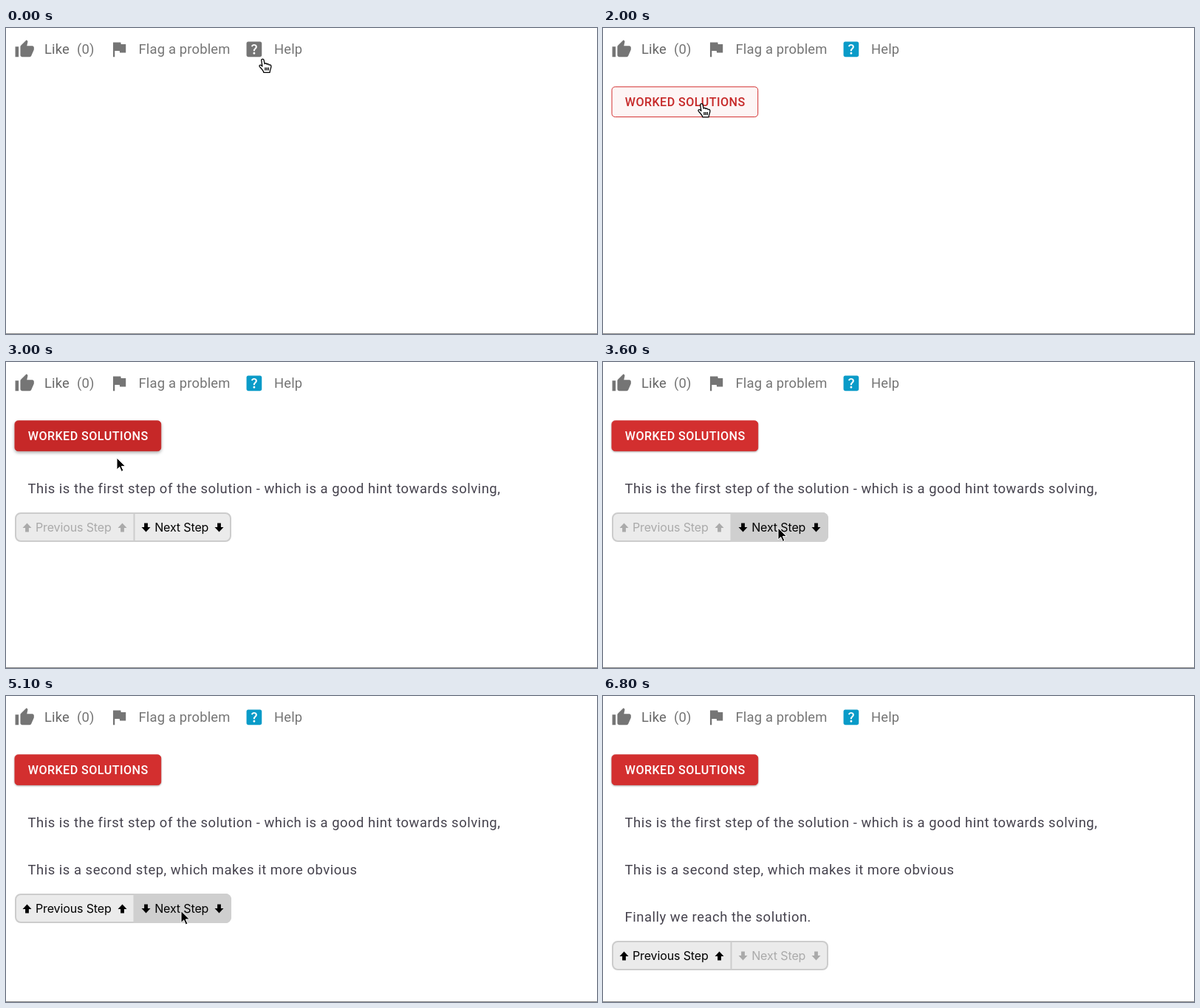
These frames come from a looping animation (800 px wide and 415 px high, 7.8 s). An HTML page:

```html
<!DOCTYPE html>
<html lang="en">
<head>
<meta charset="utf-8">
<title>Worked solutions</title>
<style>
  html, body { margin: 0; height: 100%; overflow: hidden; background: #fff; }
  svg { display: block; width: 100vw; height: 100vh; }
  text { font: 18.4px Roboto, sans-serif; letter-spacing: .17px; fill: #757575; white-space: pre; }
  .icon { fill: #757575; }
  .line { letter-spacing: .54px; fill: #45424d; }
  #label { font-size: 16.1px; font-weight: 500; letter-spacing: .46px; }
  #steps text { font: 16px Inter, sans-serif; letter-spacing: -.13px; fill: inherit; }
</style>
</head>
<body>
<svg viewBox="0 0 800 415">
  <defs>
    <clipPath id="group"><rect x="12" y="204" width="293" height="40" rx="8"/></clipPath>
    <path id="up" d="M0-6 6 .4H2.4V6h-4.8V.4H-6z"/>
    <path id="down" d="M0 6 6-.4H2.4V-6h-4.8v5.6H-6z"/>
    <path id="arrow" d="M0 0v16l3.7-3.6 2.6 6 2.6-1.1-2.6-5.9h5.2z" stroke="#fff"/>
    <g id="hand" fill="#fff" stroke="#000" stroke-width="1.3" stroke-linejoin="round">
      <path d="M-1.8 1.6C-1.8-.4 1.4-.4 1.6 1.6L2.6 6.6C3.4 5.6 5.4 5.8 5.8 7.2 6.6 6.4 8.3 6.8 8.6 8.1 10 7.4 11.4 8.2 11.4 9.8 11.4 13 10 14 9.6 18.3H1.4C.8 15.6-1.6 13.4-4.2 10.4-5.4 8.8-3.4 7.4-2 8.6L-.6 10Z"/>
      <path d="M3.4 11.5v4M5.6 11.5v4M7.8 11.5v4"/>
    </g>
    <path id="bar" d="M-3.5-9.3q3 0 3.5 2 .5-2 3.5-2M0-7.3V7.3M-3.5 9.3q3 0 3.5-2 .5 2 3.5 2M-2 3h4"/>
    <g id="ibeam" fill="none">
      <use href="#bar" stroke="#fff" stroke-width="3"/>
      <use href="#bar" stroke="#000" stroke-width="1.4"/>
    </g>
  </defs>

  <circle id="halo" cx="335.6" cy="28.6" r="22.8"/>
  <circle id="ripple" cx="335.6" cy="28.6"/>
  <path class="icon" transform="translate(11.4 15) scale(1.15)" d="M1 21h4V9H1v12zm22-11c0-1.1-.9-2-2-2h-6.31l.95-4.57.03-.32c0-.41-.17-.79-.44-1.06L14.17 1 7.59 7.59C7.22 7.95 7 8.45 7 9v10c0 1.1.9 2 2 2h9c.83 0 1.54-.5 1.84-1.22l3.02-7.05c.09-.23.14-.47.14-.73v-2z"/>
  <path class="icon" transform="translate(139.2 15) scale(1.15)" d="M14.4 6 14 4H5v17h2v-7h5.6l.4 2h7V6z"/>
  <path class="icon" id="help" transform="translate(322.1 15) scale(1.15)" d="M19 3H5c-1.1 0-2 .9-2 2v14c0 1.1.9 2 2 2h14c1.1 0 2-.9 2-2V5c0-1.1-.9-2-2-2zm-6.99 15c-.7 0-1.26-.56-1.26-1.26 0-.71.56-1.25 1.26-1.25.71 0 1.25.54 1.25 1.25-.01.69-.54 1.26-1.25 1.26zm3.01-7.4c-.76 1.11-1.48 1.46-1.87 2.17-.16.29-.22.48-.22 1.41h-1.82c0-.49-.08-1.29.31-1.98.49-.87 1.42-1.39 1.96-2.16.57-.81.25-2.33-1.37-2.33-1.06 0-1.58.8-1.8 1.48l-1.65-.7C9.01 7.15 10.22 6 11.99 6c1.48 0 2.49.67 3.01 1.52.44.72.7 2.07.02 3.08z"/>
  <text x="52" y="35" style="fill:#666">Like</text>
  <text x="96" y="35">(0)</text>
  <text x="179.5" y="35">Flag a problem</text>
  <text x="363" y="35">Help</text>

  <g id="worked">
    <rect id="face" x="12" y="79.8" width="197.7" height="40.8" rx="4.4"/>
    <text id="label" x="29.8" y="105.7">WORKED SOLUTIONS</text>
  </g>

  <text class="line" x="29.5" y="178">This is the first step of the solution - which is a good hint towards solving,</text>
  <text class="line" x="29.5" y="242">This is a second step, which makes it more obvious</text>
  <text class="line" x="29.5" y="306">Finally we reach the solution.</text>

  <g id="steps">
    <rect x="13" y="205" width="291" height="38" rx="7" fill="#ebebeb" stroke="#ccc" stroke-width="2"/>
    <path d="M173.5 205v38" stroke="#ccc" stroke-width="2"/>
    <rect id="hover" x="173" y="204" width="132" height="40" fill="#cfcfcf" clip-path="url(#group)"/>
    <g id="prev">
      <use href="#up" x="28.5" y="224.5"/><text x="40" y="230">Previous Step</text><use href="#up" x="157.5" y="224.5"/>
    </g>
    <g id="next">
      <use href="#down" x="189.5" y="224.5"/><text x="201.2" y="230">Next Step</text><use href="#down" x="288.5" y="224.5"/>
    </g>
  </g>

  <path d="M0 414.5h800" stroke="#8a8a8a"/>
  <use id="cursor"/>
</svg>
<script>
const LOOP = 7800, TICK = 100;
const $ = id => document.getElementById(id);
const lines = [...document.querySelectorAll('.line')];
const lineEnds = [670, 476, 282];

// Pointer path: time, x, y
const path = [
  [0, 347.5, 42], [200, 335, 32], [1200, 335, 32], [1300, 328, 34.5], [1600, 175, 92],
  [1800, 133.5, 102.5], [2900, 133.5, 102.5], [3000, 150, 130], [3600, 237, 225],
  [4400, 237, 225], [5100, 237, 291.5], [6000, 237, 291.5], [6400, 436, 341],
  [6600, 436, 341], [6700, 594, 260], [LOOP, 594, 260]
];

const ramp = (t, from, to) => Math.min(1, Math.max(0, (t - from) / (to - from)));
const ease = k => k * k * (3 - 2 * k);
const mix = (a, b, k) => `rgb(${a.map((v, i) => Math.round(v + (b[i] - v) * k))})`;
const show = (el, on) => el.setAttribute('visibility', on ? 'visible' : 'hidden');
const set = (el, attrs) => Object.entries(attrs).forEach(([k, v]) => el.setAttribute(k, v));

function pointerAt(t) {
  const i = path.findIndex(p => p[0] > t);
  const [t0, x0, y0] = path[i - 1], [t1, x1, y1] = path[i];
  const k = ramp(t, t0, t1);
  return [x0 + (x1 - x0) * k, y0 + (y1 - y0) * k];
}

function draw(t) {
  const [x, y] = pointerAt(t);
  const count = t < 2400 ? 0 : t < 4100 ? 1 : t < 5500 ? 2 : 3;
  const shift = 64 * (count - 1);

  // Help icon
  const ripple = ramp(t, 600, 1000);
  set($('halo'), { opacity: .045 * (ramp(t, 0, 300) - ramp(t, 1300, 1500)) });
  set($('ripple'), { r: 8 + 14 * ease(ripple), opacity: t < 700 ? 0 : .13 * (1 - ramp(t, 900, 1200)) });
  $('help').style.fill = t < 800 ? '#757575' : '#0a9bc8';

  // Worked solutions: outlined, then filled and raised
  const onButton = x > 12 && x < 210 && y > 79 && y < 121;
  const fill = t < 2400 ? 0 : ease(ramp(t, 2330, 2630));
  const rest = ease(ramp(t, 3000, 3250));
  const raise = fill * (1 - rest * .6);
  const red = [198 + 13 * rest, 40 + 7 * rest, 40 + 7 * rest];
  show($('worked'), t >= 800);
  set($('face'), {
    fill: mix(onButton ? [253, 245, 245] : [255, 255, 255], red, fill),
    stroke: fill ? mix([249, 222, 221], red, fill) : onButton ? '#d32f2f' : '#e39494'
  });
  $('face').style.filter = fill
    ? `drop-shadow(0 ${2.5 * raise}px ${2 * raise}px rgba(0,0,0,${.34 * fill}))` : 'none';
  $('label').style.fill = mix([198, 40, 40], [255, 255, 255], fill);

  // Solution steps
  lines.forEach((line, i) => show(line, i < count));
  show($('steps'), count);
  set($('steps'), { transform: `translate(0 ${shift})` });
  set($('prev'), { fill: count > 1 ? '#000' : '#aaa' });
  set($('next'), { fill: count < 3 ? '#000' : '#aaa' });
  const onNext = count && count < 3 && x > 173 && x < 305 && y > 204 + shift && y < 244 + shift;
  $('hover').style.display = onNext ? '' : 'none';

  // Pointer shape follows what lies under it
  const onHelp = Math.hypot(x - 335.6, y - 28.6) < 22.8;
  const onText = lineEnds.some((end, i) => i < count && x > 30 && x < end && Math.abs(y - 172 - 64 * i) < 12);
  const shape = onHelp || onButton ? 'hand' : onText ? 'ibeam' : 'arrow';
  set($('cursor'), { href: '#' + shape, x, y });
  show($('cursor'), t < 6800);
}

function frame() {
  draw(Math.floor(performance.now() % LOOP / TICK) * TICK);
  requestAnimationFrame(frame);
}
frame();
</script>
</body>
</html>
```
